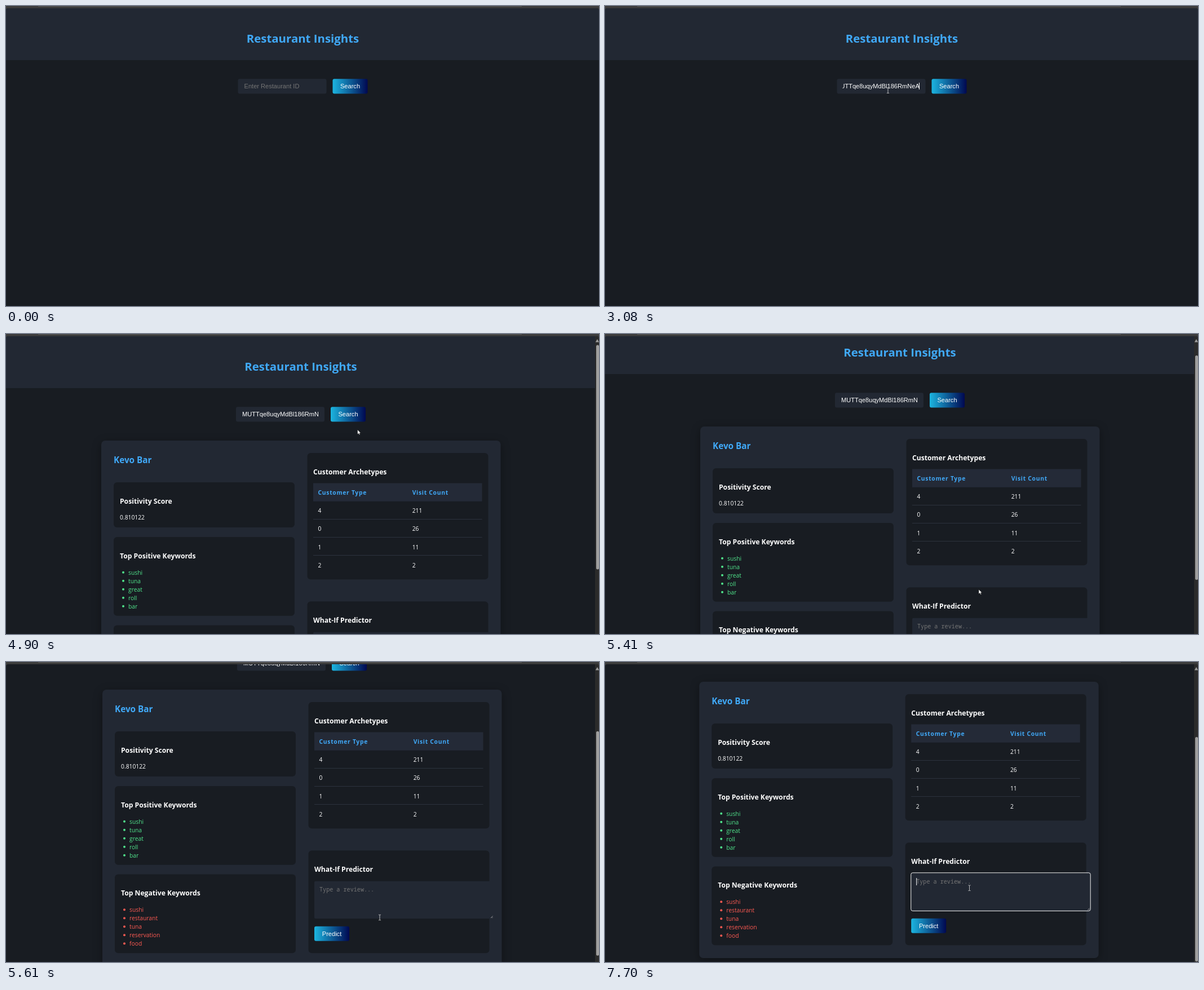
Recreate the animation shown at these times as an HTML page. Size 1052x532 px, loop 8000 ms.

```html
<!DOCTYPE html>
<html lang="en">
<head>
<meta charset="utf-8">
<title>Restaurant Insights</title>
<style>
  html, body { margin: 0; width: 100%; height: 100%; overflow: hidden; background: #181c22; }
  svg { display: block; width: 1052px; height: 532px; }
  text { font: 10.3px "Open Sans", "Noto Sans", sans-serif; fill: #fff; white-space: pre; }
  .title { font-size: 20.4px; font-weight: 700; fill: #40a9f8; text-anchor: middle; }
  .name { font-size: 15.3px; font-weight: 700; fill: #40a9f8; }
  .head { font-size: 12.15px; font-weight: 700; }
  .th { font-size: 10.35px; font-weight: 700; fill: #40a9f8; letter-spacing: .7px; }
  .ui { font: 11.09px "Liberation Sans", Arial, sans-serif; }
  .btn { text-anchor: middle; }
  .hint { fill: #757575; }
  .mono { font: 10.15px "Noto Sans Mono", "DejaVu Sans Mono", monospace; fill: #757575; }
  .good, .good text { fill: #50e68c; }
  .bad, .bad text { fill: #ff5a52; }
  .surface { fill: #222833; }
  .panel { fill: #181c22; }
  #card > .surface:first-child { filter: drop-shadow(0 4px 8px rgba(0, 0, 0, .35)); }
  .row { stroke: #2c323d; }
</style>
</head>
<body>
<svg viewBox="0 0 1052 532" xmlns="http://www.w3.org/2000/svg">
  <defs>
    <linearGradient id="cool"><stop stop-color="#1cb5e0"/><stop offset="1" stop-color="#000851"/></linearGradient>
    <linearGradient id="fresh"><stop stop-color="#00ff87"/><stop offset="1" stop-color="#008cff"/></linearGradient>
    <clipPath id="view"><path d="M0 532V8Q0 4 4 4H1048Q1052 4 1052 8V532Z"/></clipPath>
    <clipPath id="field"><rect x="418" y="130" width="136.5" height="25"/></clipPath>
  </defs>
  <rect width="1052" height="10" fill="#3c3c3c"/>
  <rect x="57" width="858" height="1" fill="#5c5c5c"/>

  <g clip-path="url(#view)">
    <rect class="panel" y="4" width="1052" height="528"/>
    <g id="page">
      <rect class="surface" x="-20" y="4" width="1092" height="92"/>
      <text class="title" x="523" y="64.5">Restaurant Insights</text>
      <rect class="surface" x="408" y="129.3" width="157" height="26.2" rx="3"/>
      <text id="hint" class="ui hint" x="419" y="146">Enter Restaurant ID</text>
      <g clip-path="url(#field)"><text id="code" class="ui" y="146">MUTTqe8uqyMdBl186RmNeA</text></g>
      <rect id="caret" y="136" width="1" height="12" fill="#fff"/>
      <rect id="search" x="576" y="129.3" width="62" height="26.2" rx="3"/>
      <text class="ui btn" x="607" y="146">Search</text>

      <g id="card">
        <rect class="surface" x="169" y="189" width="708.5" height="490" rx="7"/>
        <text class="name" x="191" y="228.5">Kevo Bar</text>
        <g class="panel">
          <rect x="191" y="263" width="321" height="80" rx="6"/>
          <rect x="191" y="360" width="321" height="139.7" rx="6"/>
          <rect x="191" y="516.5" width="321" height="139.7" rx="6"/>
          <rect x="534.5" y="211" width="321" height="224.3" rx="6"/>
          <rect x="534.5" y="474.3" width="321" height="182" rx="6"/>
        </g>
        <text class="head" x="202" y="301">Positivity Score</text>
        <text x="202" y="329.3">0.810122</text>
        <text class="head" x="202" y="398">Top Positive Keywords</text>
        <g id="good" class="good"></g>
        <text class="head" x="202" y="554">Top Negative Keywords</text>
        <g id="bad" class="bad"></g>

        <text class="head" x="545" y="248.5">Customer Archetypes</text>
        <rect x="545" y="264.5" width="299.5" height="32.3" fill="#242a37"/>
        <text class="th" x="553.5" y="285.3">Customer Type</text>
        <text class="th" x="720.7" y="285.3">Visit Count</text>
        <g id="rows"></g>

        <text class="head" x="545" y="512">What-If Predictor</text>
        <rect class="surface" x="545" y="528.7" width="317" height="66.3" rx="2"/>
        <path d="M858 594l3.5-3.5M860.3 594l1.2-1.2" stroke="#b8b8b8" stroke-width=".8"/>
        <text class="mono" x="554" y="547">Type a review...</text>
        <g id="focus">
          <rect x="544.6" y="527.8" width="318.4" height="67.6" rx="3" fill="none" stroke="#f4f4f4"/>
          <rect id="caret2" x="554" y="537" width="1" height="13" fill="#fff"/>
        </g>
        <rect x="545" y="608.8" width="62" height="25.9" rx="3" fill="url(#cool)"/>
        <text class="ui btn" x="576" y="625.5">Predict</text>
      </g>
    </g>

    <g id="bar">
      <rect x="1045" y="4" width="7" height="528" fill="#2b2b2b"/>
      <path d="M1045.8 14.5L1049 9L1052 14.5Z" fill="#9f9f9f"/>
      <rect id="thumb" x="1047" width="5" height="398" rx="2.5" fill="#9f9f9f"/>
    </g>
  </g>

  <g id="mouse">
    <circle id="click" cx="-1.6" cy="-1.3" r="8.3" fill="#ff0" fill-opacity=".47"/>
    <path id="arrow" d="M0 0V8L1.9 6.3L3.2 9L4.6 8.4L3.4 5.8H5.9Z" fill="#fff" stroke="#111" stroke-width=".5"/>
    <path id="beam" d="M-2-4.8H-.5L0-4.3L.5-4.8H2M0-4.3V4.3M-2 4.8H-.5L0 4.3L.5 4.8H2" fill="none" stroke="#cfcfcf" stroke-width=".9"/>
    <path id="hand" d="M-1 .8Q-1-.4 0-.4Q1-.4 1 .8V4L5 4.8Q6 5 6 6.2V9L5 12.4H-.3L-3.2 8.2Q-3.6 7.2-2.6 6.9L-1 8Z" fill="#fff" stroke="#111" stroke-width=".8"/>
  </g>
</svg>
<script>
const LOOP = 8000, RESULTS = 4340, PASTE = 3080, BLUR = 4140;
const $ = id => document.getElementById(id);
const set = (id, attrs) => { for (const k in attrs) $(id).setAttribute(k, attrs[k]); };
const show = (id, on) => set(id, { visibility: on ? 'inherit' : 'hidden' });
const within = (t, ...spans) => spans.some(([a, b]) => t >= a && t < b);

function list(id, y, words) {
  $(id).innerHTML = words.map((w, i) =>
    `<circle cx="208" cy="${y - 3.7 + i * 15}" r="2"/><text x="217" y="${y + i * 15}">${w}</text>`).join('');
}
list('good', 426.5, ['sushi', 'tuna', 'great', 'roll', 'bar']);
list('bad', 583, ['sushi', 'restaurant', 'tuna', 'reservation', 'food']);

$('rows').innerHTML = [[4, 211], [0, 26], [1, 11], [2, 2]].map(([type, count], i) => {
  const y = 317.3 + i * 32.1;
  const line = i < 3 ? `<path class="row" d="M545 ${328.5 + i * 32}h299.5"/>` : '';
  return `<text x="553.5" y="${y}">${type}</text><text x="720.7" y="${y}">${count}</text>${line}`;
}).join('');

const easeOut = u => 1 - (1 - u) ** 2;
const easeBoth = u => u * u * (3 - 2 * u);

// Pointer moves: first step, last step, number of steps, destination, easing
const moves = [
  [190, 390, 5, 579, 261, easeOut],
  [740, 1260, 11, 502, 149.7, easeBoth],
  [3540, 3690, 4, 659, 133, easeOut],
  [3840, 3990, 4, 619, 137, easeOut],
  [4900, 5100, 5, 663, 453, easeBoth],
  [5960, 6380, 9, 646.5, 400.7, easeBoth]
];

function pointer(t) {
  let x = 1159, y = 641;
  for (const [from, to, n, tx, ty, ease] of moves) {
    if (t < from) break;
    const step = Math.floor((t - from) * (n - 1) / (to - from) + 1e-6) + 1;
    const p = ease(Math.min(step / n, 1));
    x += (tx - x) * p;
    y += (ty - y) * p;
  }
  return [x, y];
}

// Scroll with a small sideways overshoot, one entry per 50 ms
const SCROLL = [25, 65, 104.7, 127, 140, 147, 151, 153, 154];
const DRIFT = [0, 2.8, 4.5, 3.4, 2, .7, -.6, -1.5, -1.8];

function offset(t) {
  if (t < RESULTS) return [3.5, 0];
  if (t < 5410) return [0, 0];
  const i = Math.min(Math.floor((t - 5410) / 50), SCROLL.length - 1);
  return [DRIFT[i], SCROLL[i]];
}

function draw(t) {
  const [dx, sy] = offset(t);
  const [mx, my] = pointer(t);
  const px = mx - dx, py = my + sy;
  const over = (x, y, w, h) => px >= x && px <= x + w && py >= y && py <= y + h;
  const results = t >= RESULTS;

  set('page', { transform: `translate(${dx} ${-sy})` });
  set('thumb', { y: 19.6 + sy * .736 });
  show('card', results);
  show('bar', results);

  const pasted = t >= PASTE, blurred = t >= BLUR;
  show('hint', !pasted);
  show('code', pasted);
  set('code', { x: blurred ? 419 : 554.3, 'text-anchor': blurred ? 'start' : 'end' });
  set('caret', { x: pasted ? 553.5 : 419.4 });
  show('caret', within(t, [1470, 1970], [2520, 3030], [PASTE, 3590]));
  show('focus', results && t >= 6630);
  show('caret2', results && within(t, [6630, 7190], [7700, LOOP]));

  const hot = over(576, 129, 62, 27);
  const typing = over(408, 129, 157, 27) || (results && over(545, 529, 317, 66));
  set('search', { fill: hot ? 'url(#fresh)' : 'url(#cool)' });
  set('mouse', { transform: `translate(${mx} ${my})` });
  show('hand', hot);
  show('beam', typing);
  show('arrow', !hot && !typing);
  show('click', within(t, [1470, 1610], [4140, 4290], [6630, 6780]));
}

let start;
function tick(now) {
  start ??= now;
  draw((now - start) % LOOP);
  requestAnimationFrame(tick);
}
draw(0);
requestAnimationFrame(tick);
</script>
</body>
</html>
```
